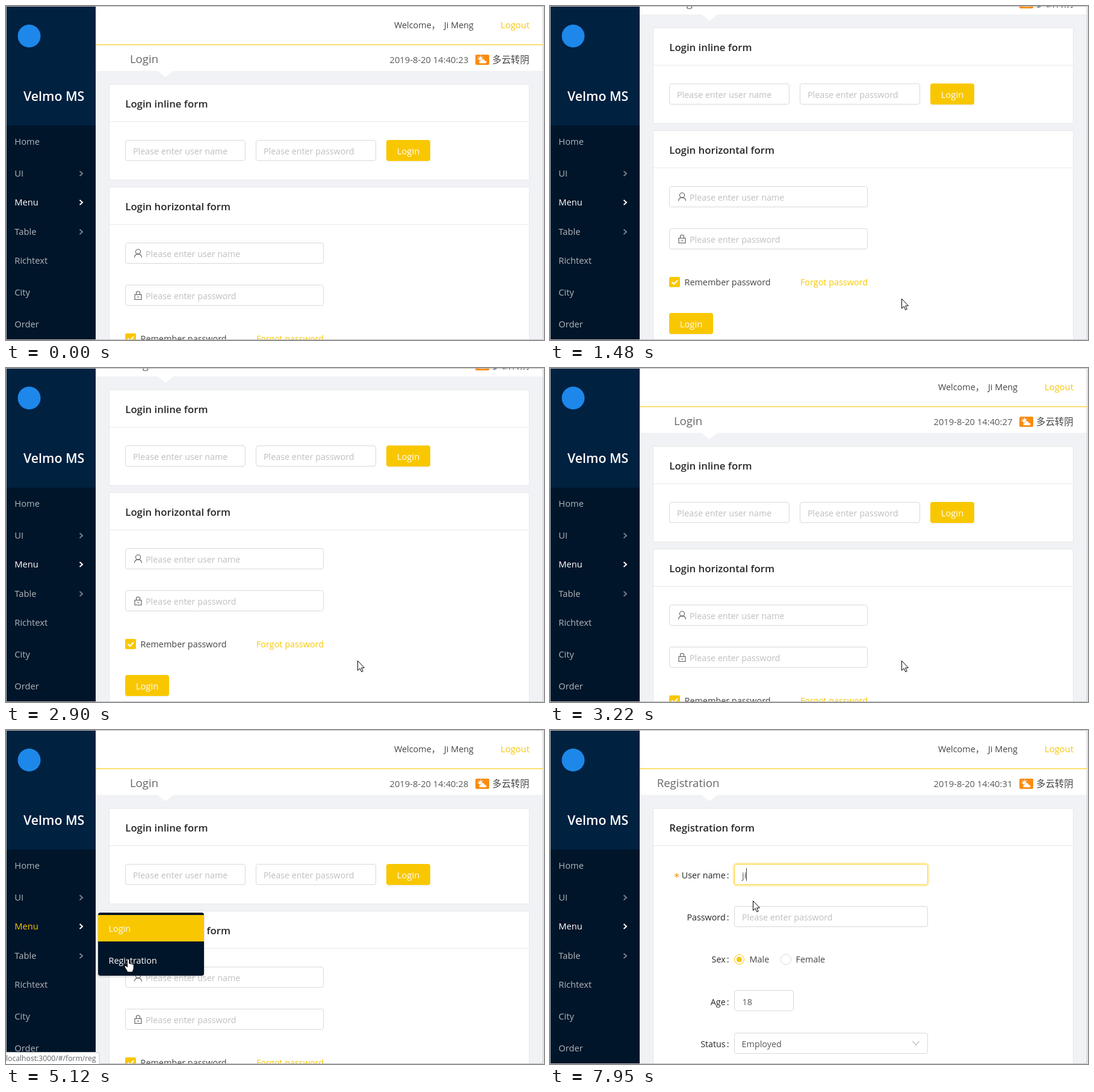
Write an HTML page that moves like this. It is 894 px wide and 556 px high and loops after 8000 ms.

```html
<!DOCTYPE html>
<html lang="en">
<head>
<meta charset="utf-8">
<title>Admin forms</title>
<style>
  html, body { margin: 0; width: 100%; height: 100%; overflow: hidden; background: #fff; }
  svg { display: block; }
  text { font: 14.4px "Open Sans", "Noto Sans", "Noto Sans CJK SC", sans-serif; fill: #444; white-space: pre; }
  .nav { fill: #b1b7bd; font-size: 14.7px; }
  .white { fill: #fff; }
  .gold { fill: #f9c700; }
  .hint { fill: #bfbfbf; font-size: 14.3px; }
  .title { font-size: 16.75px; font-weight: 600; fill: #262626; }
  .crumb { font-size: 18.6px; fill: #666; text-anchor: middle; }
  .brand { font-size: 21.3px; font-weight: 600; fill: #fff; }
  .label { fill: #262626; font-size: 14.3px; text-anchor: end; }
  .value { fill: #595959; }
  .end { text-anchor: end; }
  .clock { font-size: 14.75px; fill: #595959; }
  .cjk { font: 15.4px "Noto Sans CJK SC", "Noto Sans CJK", sans-serif; }
  .card { fill: #fff; stroke: #e8e8e8; }
  .box { fill: #fff; stroke: #d9d9d9; }
  .icon { fill: none; stroke: #595959; stroke-width: 1.1; }
  .arrow { fill: none; stroke: #77808a; stroke-width: 2; }
  .pointer { fill: #fff; stroke: #000; stroke-linejoin: round; }
  .pale { fill: #d4d4d4; }
  .url { font-size: 12.2px; fill: #5f6368; }
</style>
</head>
<body>
<svg width="894" height="556" viewBox="0 0 894 556">
  <defs>
    <clipPath id="view"><rect x="149" y="1" width="743" height="554"/></clipPath>
    <g id="button">
      <rect y="2" width="73" height="35" rx="4" opacity=".045"/>
      <rect class="gold" width="73" height="35" rx="4"/>
      <text class="white" x="36.5" y="24" text-anchor="middle" style="font-size:14.8px">Login</text>
    </g>
  </defs>

  <g clip-path="url(#view)">
    <rect x="149" width="744" height="556" fill="#f0f2f5"/>
    <g id="page">
      <rect class="white" x="149" width="744" height="108"/>
      <rect class="gold" x="149" y="64" width="744" height="1"/>
      <path class="white" d="M251 107.500H279L265 118.500Z"/>
      <text x="645" y="37">Welcome，</text>
      <text class="end" x="777" y="37">Ji Meng</text>
      <text class="gold end" x="870" y="37" style="font-size:14.9px">Logout</text>
      <text class="crumb" id="crumb" x="229.500" y="95"></text>
      <text class="clock" id="clock" x="637.500" y="95"></text>
      <rect x="780" y="81" width="23" height="17" rx="2" fill="#fa8c0f"/>
      <g class="white">
        <circle cx="788.500" cy="88" r="3"/>
        <path d="M788.500 82.500V85M783 88H786M784.500 84L787 86.500M792.500 84L790 86.500" stroke="#fff"/>
        <path d="M788 95.500C785 95 785.500 91.500 788.500 91.500C789 87 795 87 795.500 91C799.500 91 799.500 95.500 796.500 95.500Z" stroke="#fa8c0f" stroke-width=".5"/>
      </g>
      <text class="cjk" x="808" y="95">多云转阴</text>
      <g id="login"></g>
      <g id="register"></g>
    </g>
  </g>

  <rect x="1" y="1" width="148" height="554" fill="#001529"/>
  <rect x="1" y="1" width="148" height="198" fill="#002140"/>
  <circle cx="38.500" cy="50" r="19" fill="#1d87ea"/>
  <text class="brand" x="29" y="158">Velmo MS</text>
  <g id="nav"></g>

  <g id="popup">
    <rect x="152" y="305" width="178" height="107" rx="5" opacity=".1"/>
    <rect x="153" y="304" width="176" height="105" rx="4" fill="#001529"/>
    <rect class="gold" id="active" x="153" width="176" height="44"/>
    <text class="white" x="170.500" y="336">Login</text>
    <text class="white" x="170.500" y="389">Registration</text>
  </g>

  <rect x=".5" y=".5" width="892" height="555" fill="none" stroke="#bdbdbd"/>

  <g id="status">
    <rect id="plate" x="-4" y="536.500" height="24" rx="3" fill="#fff" stroke="#c8c8c8"/>
    <text class="url" id="url" x="0" y="551"></text>
  </g>

  <g id="cursor">
    <path id="plain" class="pointer" d="M.5 .5V16.500L4.200 13L6.700 18.800L9.200 17.700L6.700 12H11.500Z"/>
    <path id="hand" class="pointer" d="M-1.500 1a1.600 1.600 0 0 1 3.200 0V7a1.500 1.500 0 0 1 2.600 .6a1.500 1.500 0 0 1 2.500 .6a1.400 1.400 0 0 1 2.400 1.200V14.500C9.200 17 7.500 18 7.500 21H-1.500C-1.500 18-5 15-6 11.800C-6 10-3.500 10-1.500 12.800Z"/>
    <path id="beam" d="M-3 -7.500H3M0 -7.500V7.500M-3 7.500H3" fill="none" stroke="#000" stroke-width="1.200"/>
  </g>
</svg>
<script>
  const LOOP = 8000, STEP = 79;
  const $ = id => document.getElementById(id);
  const show = (id, on) => $(id).style.display = on ? '' : 'none';

  // Markup helpers
  const label = (cls, x, y, s, id = '') => `<text class="${cls}" id="${id}" x="${x}" y="${y}">${s}</text>`;
  const box = (x, y, w, id = '') =>
    `<rect class="box" id="${id}" x="${x + .5}" y="${y + .5}" width="${w - 1}" height="34" rx="3.5"/>`;
  const input = (x, y, w, hint, pad = 13) => box(x, y, w) + label('hint', x + pad, y + 24, hint);
  const button = (x, y) => `<use href="#button" x="${x}" y="${y}"/>`;
  const card = (y, h, title) =>
    `<rect class="card" x="171.5" y="${y + .5}" width="698" height="${h}"/>
     <rect x="172" y="${y + 62}" width="697" height="1" fill="#e8e8e8"/>` + label('title', 198.3, y + 39, title);

  const askName = 'Please enter user name', askWord = 'Please enter password';

  $('login').innerHTML =
    card(130, 159, 'Login inline form') +
    input(198, 223, 200, askName) + input(415, 223, 200, askWord) + button(632, 223) +
    card(301, 397, 'Login horizontal form') +
    input(198, 394, 330, askName, 34) + input(198, 464, 330, askWord, 34) +
    `<g class="icon">
       <circle cx="219.500" cy="409" r="4"/>
       <path d="M213.500 418.500c.3-3.500 2.500-5.600 6-5.600s5.700 2.100 6 5.600"/>
       <path d="M214 480.500H225V488.500H214ZM216.500 480V477.500a3 2.500 0 0 1 6 0V480M219.500 483V486"/>
     </g>
     <rect class="gold" x="198" y="545" width="18" height="17" rx="2"/>
     <path d="M202.500 553.500L206 557L212 550.500" fill="none" stroke="#fff" stroke-width="2.200"/>` +
    label('', 223.5, 559, 'Remember password') + label('gold end', 528, 559, 'Forgot password') +
    button(198, 605) +
    label('pale', 451.5, 783, 'Copyright：') + label('pale end', 588, 783, 'Ji Meng');

  $('register').innerHTML =
    card(130, 600, 'Registration form') +
    '<path d="M210.500 238V246M207 240L214 244M214 240L207 244" stroke="#f0a020" stroke-width="1.200"/>' +
    ['User name', 'Password', 'Sex', 'Age', 'Status'].map((s, i) =>
      label('label', 297.5, Math.round(247 + 70.2 * i), s + '<tspan dx="2">:</tspan>')).join('') +
    `<rect id="glow" x="305" y="222" width="324" height="37" rx="5" fill="none"
       stroke="#f9c700" stroke-opacity=".25" stroke-width="3"/>` +
    box(306, 223, 322, 'field') + label('hint', 319, 247, askName, 'hint') + label('value', 319, 247, '', 'typed') +
    '<rect id="caret" y="230" width="1" height="21" fill="#333"/>' +
    input(306, 293, 322, askWord) +
    `<circle cx="314.500" cy="382" r="8" fill="#fff" stroke="#f9c700"/>
     <circle class="gold" cx="314.500" cy="382" r="4.500"/>
     <circle class="box" cx="392" cy="382" r="8.500"/>` +
    label('', 331.5, 387, 'Male') + label('', 408.5, 387, 'Female') +
    box(306, 433, 99) + label('value', 319.5, 458, '18') +
    box(306, 504, 322) + label('value', 318.5, 528, 'Employed') +
    '<path d="M602.500 518L608 524.500L613.500 518" fill="none" stroke="#bfbfbf" stroke-width="1.300"/>';

  // Entries with a submenu sit a little closer to the next one.
  let navY = 231;
  for (const name of ['Home', 'UI', 'Menu', 'Table', 'Richtext', 'City', 'Order']) {
    const parent = ['UI', 'Menu', 'Table'].includes(name), y = Math.round(navY);
    $('nav').innerHTML += label('nav', 14.3, y, name, name) + (parent
      ? `<path class="arrow" d="M122.500 ${y - 9}l4.500 4l-4.500 4" ${name === 'Menu' ? 'style="stroke:#fff"' : ''}/>` : '');
    navY += parent ? 48.4 : 53;
  }

  // Motion
  const progress = (t, a, b) => Math.min(1, Math.max(0, (t - a) / (b - a)));
  const easeOut = (t, a, b) => 1 - (1 - progress(t, a, b)) ** 1.7;
  const bend = (p, c, q, k) => p * (1 - k) ** 2 + 2 * c * k * (1 - k) + q * k * k;

  // The screen refreshes in even steps from the start of each action.
  const actions = [0, 290, 1320, 2660, 3610, 4480, 5360, 7870];
  function snap(t) {
    const a = actions.filter(v => v <= t).pop();
    return a + Math.floor((t - a) / STEP) * STEP;
  }

  // Resting points of the pointer, and the curves between them.
  const spot = { edge: [15, 516], form: [584, 487], menu: [60, 326], link: [203, 382], field: [337, 252], below: [337, 284] };
  const legs = [
    { from: 290, to: 922, a: spot.edge, via: [340, 397], b: spot.form },
    { from: 3531, to: 4163, a: spot.form, via: [250, 330], b: spot.menu },
    { from: 4401, to: 5112, a: spot.menu, via: [190, 310], b: spot.link },
    { from: 5281, to: 5992, a: spot.link, via: [240, 330], b: spot.field },
    { from: 7791, to: 7949, a: spot.field, via: [337, 268], b: spot.below }
  ];
  function pointerAt(s) {
    const leg = legs.filter(l => l.from <= s).pop() || legs[0];
    const k = progress(s, leg.from, leg.to);
    return [0, 1].map(i => Math.round(bend(leg.a[i], leg.via[i], leg.b[i], k)));
  }

  function draw(t) {
    const s = snap(t);
    const within = (a, b) => t >= a && t < b;
    const registered = t >= 5280;

    const scroll = 274 * (easeOut(s, 1300, 2110) - easeOut(s, 2620, 3213));
    $('page').setAttribute('transform', `translate(0 ${-Math.round(scroll)})`);
    $('clock').textContent = '2019-8-20 14:40:' + (23 + Math.floor((t + 875) / 1015));
    $('crumb').textContent = registered ? 'Registration' : 'Login';
    show('login', !registered);
    show('register', registered);

    $('Menu').style.fill = within(4085, 5440) ? '#f9c700' : '#fff';
    const fade = progress(s, 4170, 4320) - progress(s, 5360, 5600);
    show('popup', fade > 0);
    $('popup').style.opacity = fade;
    $('active').setAttribute('y', registered ? 361 : 308);

    const onLogin = t < 4960;
    show('status', within(4720, 5440));
    $('url').textContent = 'localhost:3000/#/form/' + (onLogin ? 'login' : 'reg');
    $('plate').setAttribute('width', onLogin ? 176 : 159);

    const focused = t >= 6070;
    const typed = t < 7250 ? '' : t < 7640 ? 'j' : 'ji';
    $('field').style.stroke = focused ? '#fad32e' : '';
    show('glow', t >= 6150);
    show('hint', !typed);
    $('typed').textContent = typed;
    show('caret', focused && !within(6630, 7100));
    $('caret').setAttribute('x', 319 + Math.round(3.6 * typed.length));

    const hand = within(4005, 5440), beam = within(5840, 7870);
    show('cursor', t >= 290);
    $('cursor').setAttribute('transform', `translate(${pointerAt(s)})`);
    show('hand', hand);
    show('beam', beam);
    show('plain', !hand && !beam);
  }

  const start = performance.now();
  function frame() {
    draw((performance.now() - start) % LOOP);
    requestAnimationFrame(frame);
  }
  frame();
</script>
</body>
</html>
```
